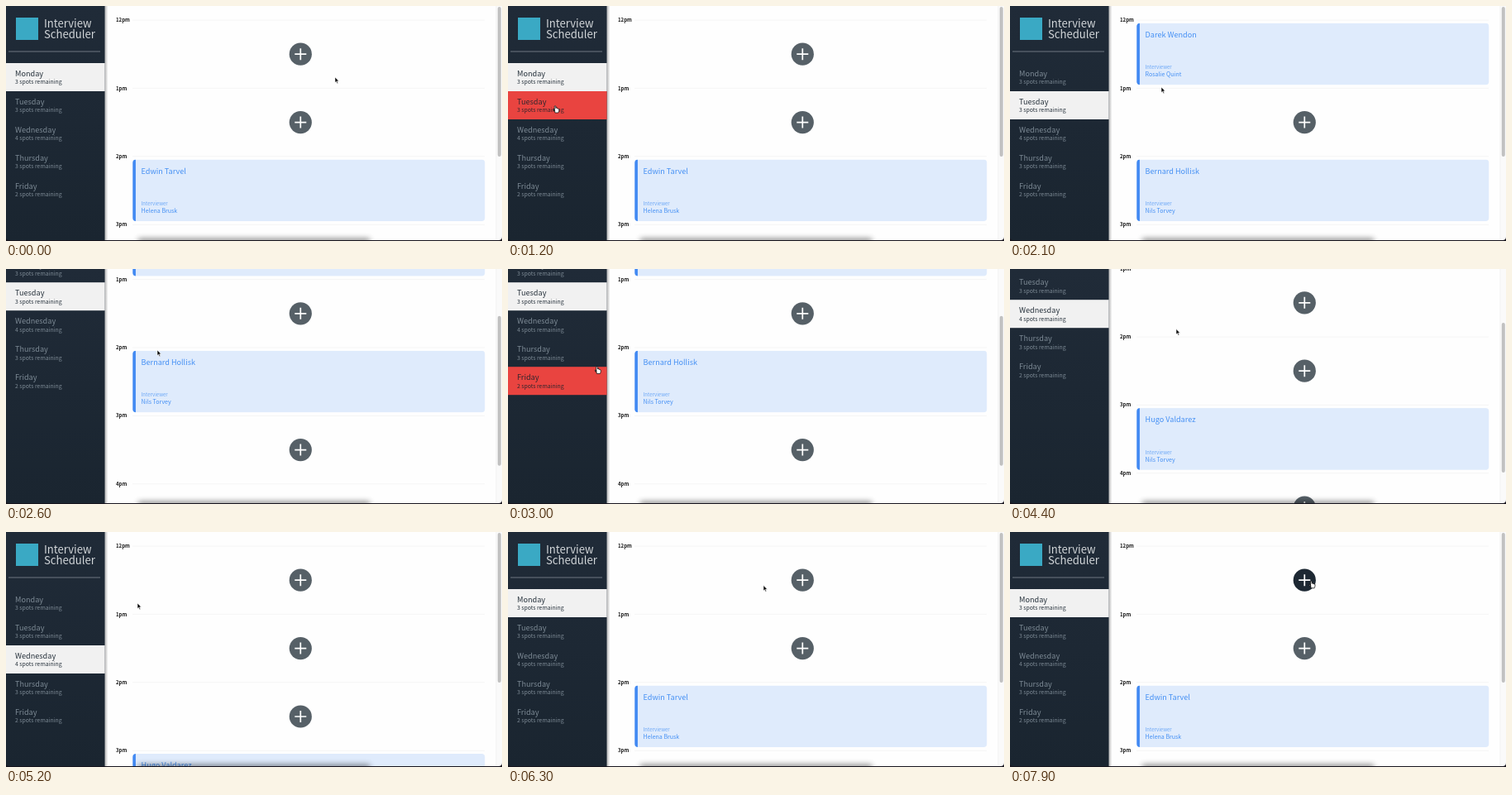
An HTML page that plays this animation: 600 px wide and 284 px high, repeating every 8000 ms.

```html
<!DOCTYPE html>
<html lang="en">
<head>
<meta charset="utf-8">
<title>Interview Scheduler</title>
<style>
html, body { margin: 0; width: 100%; height: 100%; overflow: hidden; background: #fefefe; }
svg { display: block; width: 600px; height: 284px; }
text { font-family: "Noto Sans CJK JP", "Noto Sans CJK SC", "Open Sans", sans-serif; }
.title { font-size: 13.1px; font-weight: 300; fill: #d3d7da; }
.day { font-size: 9.15px; }
.spots { font-size: 6.85px; }
.row { fill: #7d8a95; }
.row rect { fill: none; }
.row.hover { fill: #33262d; }
.row.hover rect { fill: #e94440; }
.row.on { fill: #28333d; }
.row.on rect { fill: #f1f1f1; }
.hour { font-size: 6.05px; font-weight: 700; fill: #161616; }
.card { fill: #4590f4; }
.name { font-size: 9.1px; }
.role { font-size: 6px; fill: #6ba7f6; }
.who { font-size: 7.05px; font-weight: 500; }
.add circle { fill: #566067; }
.add.hover circle { fill: #1d2833; }
.add path { fill: none; stroke: #fff; stroke-width: 1.7; }
</style>
</head>
<body>
<svg id="stage" viewBox="0 0 600 284">
  <defs>
    <linearGradient id="side" x2="0" y2="1">
      <stop stop-color="#202b38"/><stop offset="1" stop-color="#1a2530"/>
    </linearGradient>
    <linearGradient id="edge">
      <stop stop-color="#000" stop-opacity=".28"/><stop offset="1" stop-color="#000" stop-opacity="0"/>
    </linearGradient>
    <filter id="blur" x="-10%" y="-200%" width="120%" height="500%"><feGaussianBlur stdDeviation="3.5"/></filter>
    <clipPath id="round"><rect x="153.3" width="426" height="74.6" rx="4"/></clipPath>
  </defs>
  <rect width="600" height="284" fill="#fefefe"/>
  <rect x="119.5" width="4" height="284" fill="url(#edge)"/>
  <rect width="119.6" height="284" fill="url(#side)"/>
  <g id="page">
    <rect x="12" y="14" width="27" height="27" fill="#3aa9c4"/>
    <text class="title" x="46" y="26">Interview</text>
    <text class="title" x="46" y="38.7">Scheduler</text>
    <path d="M3 55H114" stroke="#77818a" stroke-width=".9"/>
    <g id="nav"></g>
    <g id="hours"></g>
    <g id="plans"></g>
  </g>
  <rect x="593" width="7" height="284" fill="#fafafa"/>
  <path d="M593 0V284" stroke="#ececec" stroke-width=".6"/>
  <rect id="thumb" x="594.8" y="1" width="4" height="181" rx="2" fill="#c1c1c1"/>
  <rect x="160" y="281" width="280" height="8" fill="#000" opacity=".45" filter="url(#blur)"/>
  <path d="M0 284V280Q0 283 4 283H596Q600 283 600 279V284Z" fill="#17141d"/>
  <g id="pointer" stroke-linejoin="round">
    <path id="arrow" d="M0 0V6.6L1.5 5.2L2.6 7.8L3.7 7.3L2.6 4.8H4.7Z" fill="#000" stroke="#fff" stroke-width=".6"/>
    <g id="hand" stroke="#000" stroke-width=".7">
      <path d="M-.8 0Q0-.9.8 0V2.6Q2-.1 2.4 2.9Q3.4 2.4 3.6 3.3Q4.8 2.9 4.8 4.2Q4.8 6.4 3.9 8H-.2Q-1-.0-1.2 6Q-2.8 4.2-2.3 3.7Q-1.6 3.3-.8 4.4Z" fill="#fff"/>
    </g>
  </g>
</svg>
<script>
const LOOP = 8000, STEP = 100;
const ROW = 82.4, CARD_TOP = 20.7, NAV_TOP = 69, NAV_ROW = 34;
const ADD_X = 356.3, ADD_Y = 58.2, ADD_R = 13.6;

const days = [["Monday", 3], ["Tuesday", 3], ["Wednesday", 4], ["Thursday", 3], ["Friday", 2]];
const hours = ["12pm", "1pm", "2pm", "3pm", "4pm", "5pm"];

// Booked slots for each day shown: slot -> [student, interviewer]
const plans = [
  { 2: ["Edwin Tarvel", "Helena Brusk"] },
  { 0: ["Darek Wendon", "Rosalie Quint"], 2: ["Bernard Hollisk", "Nils Torvey"] },
  { 3: ["Hugo Valdarez", "Nils Torvey"] }
];

// [time, value...]
const moves = [
  [0, 398, 86], [100, 390, 87], [800, 66, 116], [1000, 57, 121], [1500, 57, 121],
  [2000, 183, 98], [2600, 183, 98], [3000, 107.5, 118.5], [3300, 62, 66], [3650, 62, 66],
  [4100, 201, 72.5], [5000, 201, 72.5], [5200, 159, 86], [5450, 58, 86], [5750, 58, 86],
  [6300, 309, 64.5], [6600, 336, 62], [6900, 369, 61], [7500, 369, 61], [7900, 364.3, 59.8]
];
const scrolls = [[0, 0], [2100, 0], [2600, 86.8], [4100, 86.8], [4400, 99.8], [4850, 99.8], [5150, 0]];
const clicks = [[0, 0], [1300, 1], [3500, 2], [5600, 0]];

const $ = id => document.getElementById(id);
const text = (cls, x, y, s) => `<text class="${cls}" x="${x}" y="${y}">${s}</text>`;

$("nav").innerHTML = days.map(([day, n], i) => {
  const y = NAV_TOP + i * NAV_ROW;
  return `<g class="row"><rect y="${y}" width="119.6" height="${NAV_ROW}"/>` +
    text("day", 11, y + 15.6, day) + text("spots", 11, y + 25.4, n + " spots remaining") + "</g>";
}).join("");

$("hours").innerHTML = hours.map((h, i) => {
  const y = 17 + i * ROW;
  return text("hour", 133, y + 2.1, h) + `<path d="M153 ${y}H579" stroke="#f5f5f5"/>`;
}).join("");

function card(slot, [name, who]) {
  return `<g class="card" transform="translate(0 ${CARD_TOP + slot * ROW})">
    <g clip-path="url(#round)"><rect x="153" width="427" height="75" fill="#dfebfc"/>
    <rect x="153" width="3.9" height="75" fill="#4189f2"/></g>` +
    text("name", 163.6, 17.2, name) + text("role", 163.6, 55.6, "Interviewer") +
    text("who", 163.6, 64.6, who) + "</g>";
}

function add(slot) {
  return `<g class="add" data-slot="${slot}" transform="translate(${ADD_X} ${ADD_Y + slot * ROW})">
    <circle r="${ADD_R}"/><path d="M-7 0H7M0-7V7"/></g>`;
}

$("plans").innerHTML = plans.map(plan =>
  "<g>" + [0, 1, 2, 3, 4].map(s => plan[s] ? card(s, plan[s]) : add(s)).join("") + "</g>"
).join("");

const rows = [...$("nav").children];
const lists = [...$("plans").children];
const adds = [...document.querySelectorAll(".add")];

// Smooth value of a keyed track at time t
function at(track, t) {
  const i = track.findIndex(k => k[0] > t);
  if (i < 0) return track[track.length - 1].slice(1);
  const a = track[i - 1], b = track[i];
  const p = (t - a[0]) / (b[0] - a[0]), e = p * p * (3 - 2 * p);
  return a.slice(1).map((v, j) => v + (b[j + 1] - v) * e);
}

function draw(t) {
  const [x, y] = at(moves, t), [scroll] = at(scrolls, t);
  const day = clicks.filter(c => c[0] <= t).pop()[1];
  const py = y + scroll;
  const over = x < 119.6 ? Math.floor((py - NAV_TOP) / NAV_ROW) : -1;

  $("page").setAttribute("transform", `translate(0 ${-scroll})`);
  $("thumb").setAttribute("y", 1 + scroll * 0.642);
  rows.forEach((r, i) => r.setAttribute("class", "row" + (i === day ? " on" : i === over ? " hover" : "")));
  lists.forEach((l, i) => l.setAttribute("display", i === day ? "inline" : "none"));

  let link = over >= 0 && over < days.length;
  adds.forEach(b => {
    const hit = Math.hypot(x - ADD_X, py - ADD_Y - b.dataset.slot * ROW) < ADD_R;
    b.classList.toggle("hover", hit);
    link = link || hit;
  });
  $("pointer").setAttribute("transform", `translate(${x} ${y})`);
  $("arrow").setAttribute("display", link ? "none" : "inline");
  $("hand").setAttribute("display", link ? "inline" : "none");
}

const start = performance.now();
function tick() {
  const t = (performance.now() - start) % LOOP;
  draw(Math.floor(t / STEP) * STEP);
  requestAnimationFrame(tick);
}
tick();
</script>
</body>
</html>
```
